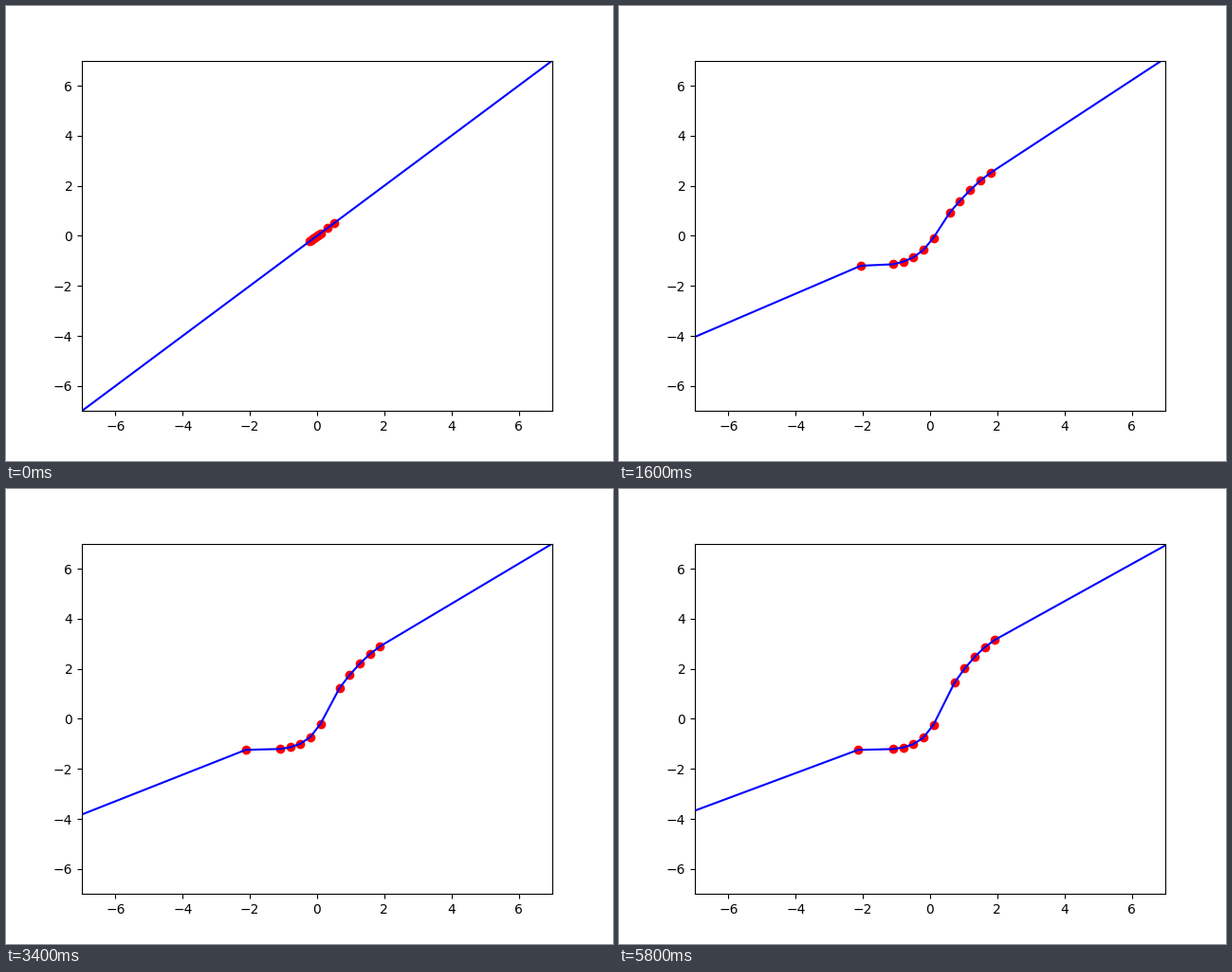
Write a matplotlib script that moves like this. It is 640 px wide and 480 px high and loops after 6 s.

```python
import numpy as np
import matplotlib.pyplot as plt
from matplotlib.animation import FuncAnimation

FRAMES, INTERVAL = 30, 200
LIMIT = 7
GAP = .3  # smallest distance between neighbouring knots

START = np.r_[np.linspace(-.22, .1, 9), .3, .5]
LEFT = np.arange(6)
RIGHT = np.arange(5)


def knots_x(t):
    """Inner knots stay put, the outer ones drift apart."""
    inner = -1.1 + GAP * RIGHT
    first = min(inner[0] - GAP, -2.175 + .9 / t)
    right = max(inner[-1] + GAP, .356 + .111 * np.log(t)) + GAP * RIGHT
    right[-1] = max(right[-1], 1.81)
    return np.r_[-LIMIT, first, inner, right, LIMIT]


def knots_y(t):
    """The left arm settles on a bent floor, the right arm keeps rising."""
    floor = -1.275 + 1.03 * .5 ** (5 - LEFT)
    begin = -.4 + .15 * LEFT
    left = floor + (begin - floor) * np.exp(-(.365 - .041 * LEFT) * t)

    slow = np.exp(-.06 * t)
    base = 1.657 - 1.178 * slow
    slope = .646 - .25 * slow
    bend = -.0523 + .0474 * slow
    right = base + slope * RIGHT + bend * RIGHT ** 2

    return np.r_[-4.64 + .288 * np.log(t), left, right, 6.86 + .38 * slow]


def curve(t):
    """Piecewise linear function, the identity before learning begins."""
    if t == 0:
        x = np.r_[-LIMIT, START, LIMIT]
        return x, x
    return knots_x(t), knots_y(t)


fig, ax = plt.subplots(figsize=(6.4, 4.8), dpi=100)
ax.set_xlim(-LIMIT, LIMIT)
ax.set_ylim(-LIMIT, LIMIT)
dots = ax.scatter(START, START, color="red")
line, = ax.plot([], [], color="blue")


def update(step):
    x, y = curve(step)
    line.set_data(x, y)
    dots.set_offsets(np.column_stack([x, y])[1:-1])
    return line, dots


anim = FuncAnimation(fig, update, frames=FRAMES, interval=INTERVAL, repeat=True, repeat_delay=0)
plt.show()
```
